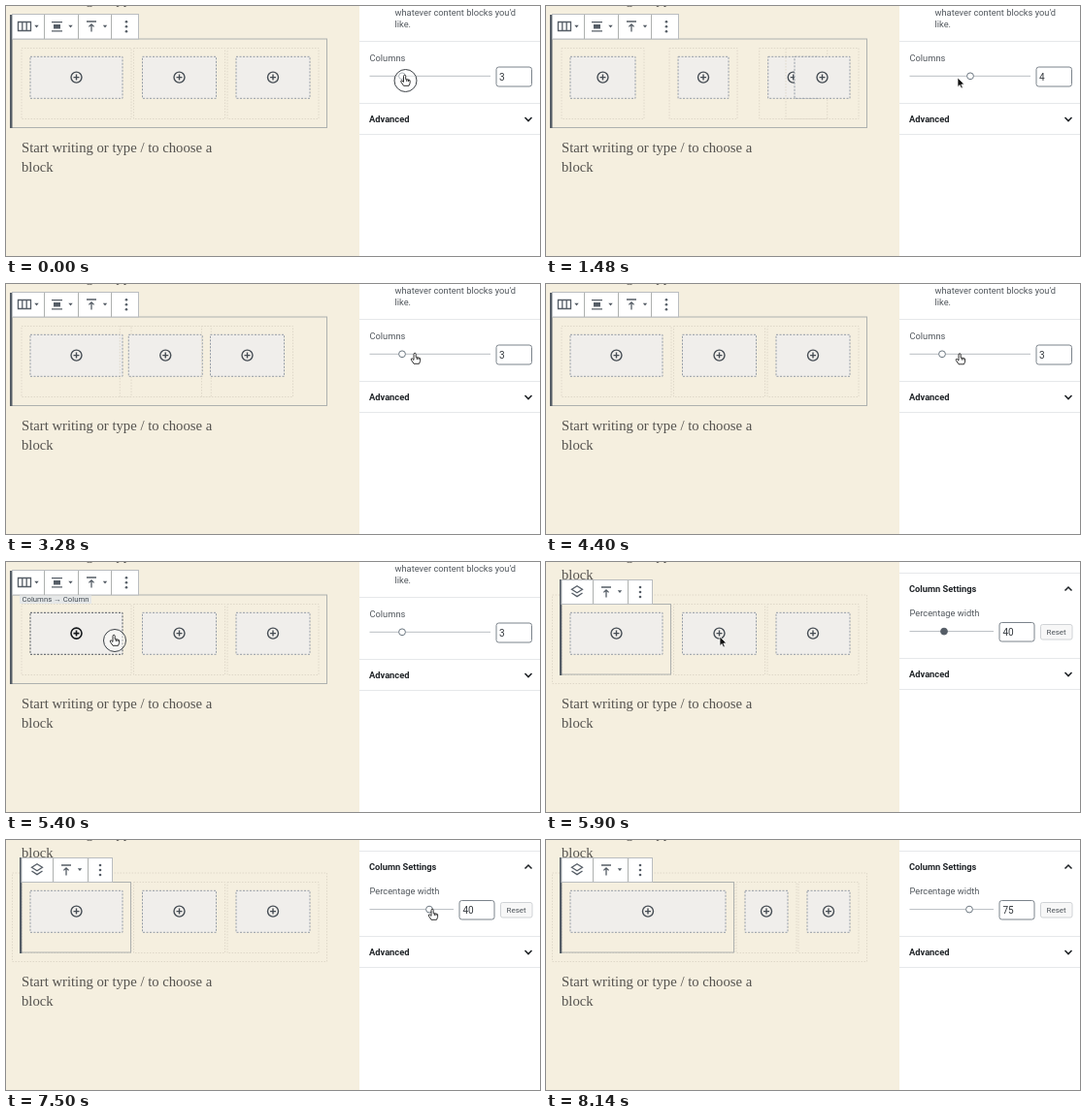
Recreate the animation shown at these times as an HTML page. Size 550x258 px, loop 9140 ms.

```html
<!DOCTYPE html>
<html lang="en">
<head>
<meta charset="utf-8">
<title>Column block settings</title>
<style>
  html, body { margin: 0; width: 100%; height: 100%; overflow: hidden; background: #fff; }
  svg { display: block; width: 550px; height: 258px; }
  text { font: 9.3px Roboto, "Liberation Sans", sans-serif; fill: #50565c; }
  .prose text { font: 14.7px "Liberation Serif", serif; fill: #55534f; }
  text.head { font-weight: 700; fill: #1e2226; }
  text.value { font-size: 10px; fill: #32373c; }
  text.crumb { font-size: 7.75px; fill: #454d55; }
  text.small { font-size: 8px; }
  .line { fill: none; stroke: #e6e8ea; }
  .track { stroke: #b9bdc2; }
  .thumb { fill: #fff; stroke: #6c7781; }
  .thumb.solid { fill: #555d66; stroke: #555d66; }
  .field { fill: #fff; stroke: #7b838b; }
  .button { fill: #f7f7f7; stroke: #d0d3d6; }
  .chevron { fill: none; stroke: #1e2226; stroke-width: 1.5; }
  .bar { fill: #555d66; }
  .frame { fill: none; stroke: #aeb1af; }
  .faint { fill: none; stroke: #dfd8c9; stroke-dasharray: 1.5 1.5; }
  .drop { fill: #f0eeeb; stroke: #949ca6; stroke-dasharray: 2 1.5; }
  .plus { fill: none; stroke: #464d54; stroke-width: 1.4; }
  .hot .drop { stroke: #4f565e; }
  .hot .plus { stroke: #16191c; stroke-width: 1.6; }
  .tools { fill: #fff; stroke: #babdc0; }
  .icon { fill: none; stroke: #555d66; stroke-width: 1.3; }
  .dark { fill: #555d66; }
</style>
</head>
<body>
<svg viewBox="0 0 550 258">
  <defs>
    <path id="caret" class="dark" d="M-2.2-1.2H2.2L0 1.6Z"/>
    <g id="dots" class="dark">
      <circle cy="-5" r="1.3"/><circle r="1.3"/><circle cy="5" r="1.3"/>
    </g>
    <path id="top" class="icon" d="M-5-5H5M0 5.5V-2M-2.6 .4L0-2.2 2.6 .4"/>
    <path id="down" class="chevron" d="M-3.5-1.8L0 1.8 3.5-1.8"/>
  </defs>

  <rect width="364" height="258" fill="#f5efdf"/>
  <g class="prose">
    <text x="16" y="-2">Start writing or type / to choose a</text>
    <text x="16" y="18">block</text>
    <text x="16" y="150.5">Start writing or type / to choose a</text>
    <text x="16" y="170.5">block</text>
  </g>

  <g id="cols"></g>

  <g id="blockUi">
    <rect class="frame" x="5.5" y="34" width="325" height="91.5"/>
    <rect class="bar" x="4" y="9" width="2.5" height="117"/>
    <rect class="tools" x="6.5" y="8.5" width="130" height="25.5"/>
    <path class="frame" d="M39.5 9V34M74.5 9V34M108.5 9V34"/>
    <path class="icon" d="M12.5 16.5H25.5V25.5H12.5ZM16.8 16.5V25.5M21.2 16.5V25.5"/>
    <path class="icon" d="M47 16.6H58M47 25.9H58"/>
    <rect class="dark" x="49" y="19" width="7" height="4.5"/>
    <use href="#top" x="88" y="21"/>
    <use href="#caret" x="31.5" y="21"/>
    <use href="#caret" x="66.5" y="21"/>
    <use href="#caret" x="102" y="21"/>
    <use href="#dots" x="124" y="21.3"/>
    <g id="crumb">
      <rect x="14" y="34.5" width="74" height="8.5" fill="#e6e8e8"/>
      <text class="crumb" x="16.5" y="41.3">Columns → Column</text>
    </g>
  </g>

  <g id="colUi">
    <rect class="faint" x="6.5" y="34" width="324" height="91.5"/>
    <rect id="picked" class="frame" x="15.5" y="43.5" width="113" height="72.5"/>
    <rect class="bar" x="14" y="18" width="2.3" height="99"/>
    <rect class="tools" x="16" y="18.5" width="93.5" height="25"/>
    <path class="frame" d="M48.5 19V43M84.5 19V43"/>
    <path class="icon" d="M32 24.8L37.5 28.3 32 31.8 26.5 28.3ZM26.5 32L32 35.6 37.5 32"/>
    <use href="#top" x="62" y="31"/>
    <use href="#caret" x="76" y="30.5"/>
    <use href="#dots" x="97" y="31"/>
  </g>

  <g id="blockPanel">
    <text x="400.5" y="10">whatever content blocks you'd</text>
    <text x="400.5" y="22">like.</text>
    <path class="line" d="M364 36.5H550M364 100.5H550M364 132.5H550"/>
    <text x="374.5" y="57">Columns</text>
    <path class="track" d="M374.5 72.3H499"/>
    <circle id="countThumb" class="thumb" cy="72.3" r="3.4"/>
    <rect class="field" x="505" y="63" width="36.5" height="20" rx="2.5"/>
    <text id="count" class="value" x="508" y="76.7">3</text>
    <text class="head" x="374" y="120">Advanced</text>
    <use href="#down" x="538" y="116.8"/>
  </g>

  <g id="colPanel">
    <path class="line" d="M364 11.5H550M364 99.5H550M364 131.5H550"/>
    <text class="head" x="374" y="31">Column Settings</text>
    <use href="#down" transform="translate(538 27.8) scale(1 -1)"/>
    <text x="374.5" y="56">Percentage width</text>
    <path class="track" d="M374.5 71.6H461"/>
    <circle id="widthThumb" class="thumb" cy="71.6" r="3.4"/>
    <rect class="field" x="467" y="62.5" width="36" height="19.5" rx="2.5"/>
    <text id="width" class="value" x="470.5" y="76">40</text>
    <rect class="button" x="509.5" y="64.5" width="32.5" height="15.5" rx="2"/>
    <text class="small" x="515.5" y="75.2">Reset</text>
    <text class="head" x="374" y="119">Advanced</text>
    <use href="#down" x="538" y="115.8"/>
  </g>

  <g id="cursor">
    <circle id="press" r="11.5" fill="#fff" fill-opacity=".45" stroke="#3c4146"/>
    <path id="hand" fill="#fff" stroke="#1b1b1b" stroke-width=".9" stroke-linejoin="round"
      d="M-2 5.3L-4.7 1.2Q-5-.4-3.7-.1L-2 1.4V-4.5Q-1.9-5.8-.9-5.8T.2-4.5V-1.3Q2.8-1.5 4.6-.3V2.6L3.5 5.3ZM1.3-1V1M3-.8V1"/>
    <path id="arrow" fill="#111" stroke="#fff" stroke-width=".7"
      d="M-1-6V3.5L1.2 1.6 2.7 5 4.3 4.3 2.8 1 5.8 .8Z"/>
  </g>
</svg>
<script>
const LOOP = 9140, STEP = 160;
const starts = [0, 1000, 2960, 5400, 5900];
const $ = id => document.getElementById(id);
const lerp = (a, b, u) => a + (b - a) * u;
const clamp = u => Math.min(1, Math.max(0, u));
const ease = u => u * u * (3 - 2 * u);
const show = (id, on) => $(id).setAttribute('display', on ? 'inline' : 'none');
const set = (el, attrs) => { for (const k in attrs) el.setAttribute(k, attrs[k]); };

// [x, width] of each column
const three = [[16, 113], [131.5, 94], [228, 94]];
const four = [[16, 85], [103, 70], [175, 70], [247, 75]];
const wide = [[16, 178], [196, 62], [260, 62]];
const moves = [
  { at: 1320, ms: 640, from: three, to: four },
  { at: 2960, ms: 640, from: four, to: three },
  { at: 7660, ms: 480, from: three, to: wide }
];

// time, x, y
const path = [
  [0, 411.5, 77], [999, 411.5, 77], [1000, 416, 78], [1160, 420, 79], [1320, 420, 79],
  [1480, 425, 80], [1960, 438, 78], [2959, 438, 78], [2960, 433, 78], [3280, 422, 77],
  [3600, 419, 77], [4080, 426.5, 77], [4399, 426.5, 77], [4400, 427, 77.5],
  [5399, 427, 77.5], [5400, 112, 81], [5899, 112, 81], [5900, 180, 83],
  [6380, 494, 91], [6860, 412, 77], [7020, 415, 77], [7500, 440, 77]
];

const cols = four.map(() => {
  const g = document.createElementNS('http://www.w3.org/2000/svg', 'g');
  g.innerHTML = `<rect class="faint" y="43.5" height="73"/>
    <rect class="drop" x="9" y="52.3" height="43"/>
    <path class="plus" d="M-5.5 0a5.5 5.5 0 1 0 11 0a5.5 5.5 0 1 0-11 0M-3 0H3M0-3V3"/>`;
  $('cols').append(g);
  return g;
});

function pointAt(t) {
  const i = path.findIndex(k => k[0] > t);
  if (i < 0) return path[path.length - 1].slice(1);
  const a = path[i - 1], b = path[i], u = (t - a[0]) / (b[0] - a[0]);
  return [lerp(a[1], b[1], u), lerp(a[2], b[2], u)];
}

function layoutAt(t) {
  const m = moves.filter(m => t > m.at).pop();
  if (!m) return three;
  const u = ease(clamp((t - m.at) / m.ms));
  return m.to.map(([x, w], i) => [m.from[i] ? lerp(m.from[i][0], x, u) : x, w]);
}

function draw(now) {
  const time = now % LOOP;
  const start = starts.filter(s => s <= time).pop();
  const t = start + Math.floor((time - start) / STEP) * STEP;
  const within = (a, b) => t >= a && t < b;
  const inColumn = t >= 5900, hover = within(5400, 5900);

  const layout = layoutAt(t);
  cols.forEach((g, i) => {
    g.setAttribute('display', layout[i] ? 'inline' : 'none');
    if (!layout[i]) return;
    const [x, w] = layout[i], [outer, inner, plus] = g.children;
    set(g, { transform: `translate(${x} 0)`, class: hover && !i ? 'hot' : '' });
    set(outer, { width: w });
    set(inner, { width: w - 18 });
    set(plus, { transform: `translate(${w / 2} 73.6)` });
  });
  set($('picked'), { width: layout[0][1] });

  show('blockUi', !inColumn);
  show('blockPanel', !inColumn);
  show('colUi', inColumn);
  show('colPanel', inColumn);
  show('crumb', hover);

  const more = within(1480, 3120);
  set($('countThumb'), { cx: more ? 437 : 408 });
  $('count').textContent = more ? 4 : 3;
  set($('widthThumb'), {
    cx: lerp(410, 436, clamp((t - 6860) / 640)),
    class: t < 7020 ? 'thumb solid' : 'thumb'
  });
  $('width').textContent = t < 7820 ? 40 : 75;

  const arrow = within(1480, 1640) || within(5900, 6700);
  set($('cursor'), { transform: `translate(${pointAt(t)})` });
  show('cursor', t < 7980);
  show('press', t < 1000 || hover);
  show('arrow', arrow);
  show('hand', !arrow);
}

const born = performance.now();
function tick() {
  draw(performance.now() - born);
  requestAnimationFrame(tick);
}
tick();
</script>
</body>
</html>
```
